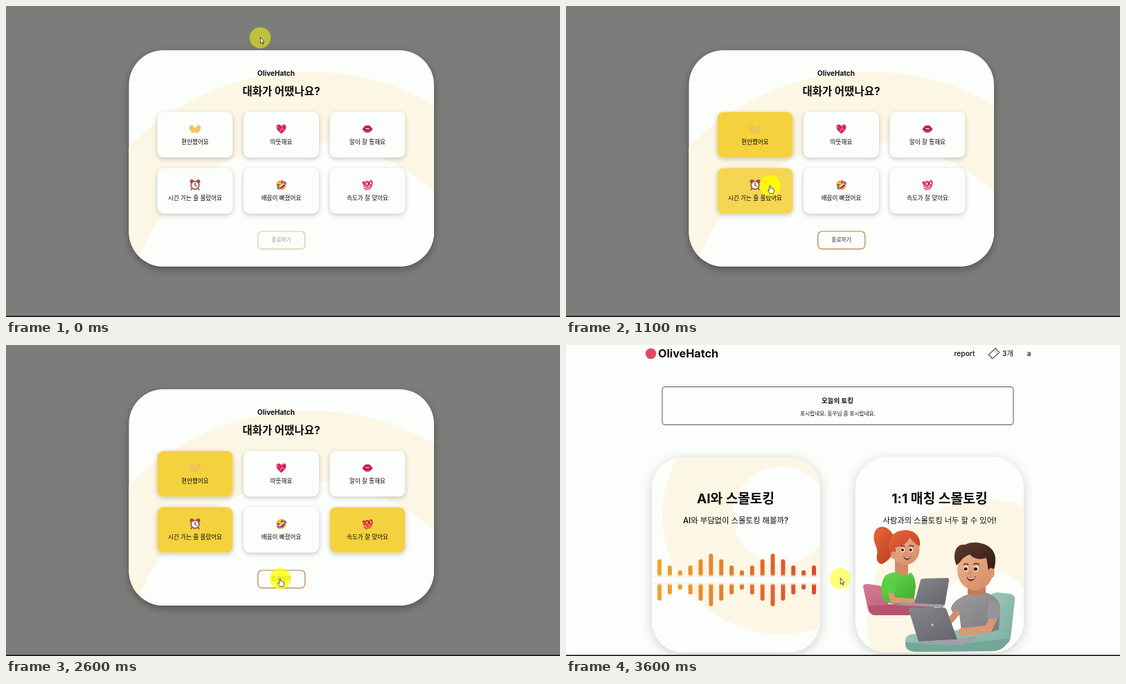
These frames come from a looping animation (800x450 px, 4000 ms). An HTML page:

```html
<!DOCTYPE html>
<html lang="ko">
<head>
<meta charset="utf-8">
<title>OliveHatch</title>
<style>
html, body { margin: 0; width: 100%; height: 100%; overflow: hidden; background: #7b7d7a; }
svg { display: block; width: 100%; height: 100%; }
text { font-family: Inter, "Noto Sans CJK KR", "Noto Sans CJK", sans-serif; text-anchor: middle; fill: #0c0c0c; }
.modal { filter: drop-shadow(0 4px 6px rgba(0,0,0,.32)); }
.card { filter: drop-shadow(0 2px 3px rgba(0,0,0,.22)); }
.panel { filter: drop-shadow(0 3px 8px rgba(0,0,0,.18)); }
</style>
</head>
<body>
<svg id="stage" viewBox="0 0 800 450" preserveAspectRatio="none"></svg>
<script>
const LOOP = 4000, STEP = 100;
const PAPER = '#fcfefb', CREAM = '#fcf6e4';
const stage = document.getElementById('stage');

const text = (s, x, cy, size, weight = 500, extra = '') =>
  `<text x="${x}" y="${cy + size * .37}" font-size="${size}" font-weight="${weight}" ${extra}>${s}</text>`;
const rect = (x, y, w, h, r, fill, extra = '') =>
  `<rect x="${x}" y="${y}" width="${w}" height="${h}" rx="${r}" fill="${fill}" ${extra}/>`;
const circle = (x, y, r, fill, extra = '') =>
  `<circle cx="${x}" cy="${y}" r="${r}" fill="${fill}" ${extra}/>`;
const oval = (x, y, rx, ry, fill, extra = '') =>
  `<ellipse cx="${x}" cy="${y}" rx="${rx}" ry="${ry}" fill="${fill}" ${extra}/>`;
const path = (d, fill, extra = '') => `<path d="${d}" fill="${fill}" ${extra}/>`;
const line = (d, color, width, extra = '') =>
  path(d, 'none', `stroke="${color}" stroke-width="${width}" stroke-linecap="round" stroke-linejoin="round" ${extra}`);
const rings = (x, y, outer, inner) => circle(x, y, outer, CREAM) + circle(x, y, inner, PAPER);

// Icons are drawn around 0,0 in a 16 px box
const hand = path('M-.6 4.6 C-2 6-4.4 5.8-5.6 4 L-8-1.2 C-8.2-2.6-7-2.8-6.6-2 L-7-4.2 C-6.8-5.5-5.5-5.2-5.2-4 L-4.9-4.8 C-4.4-6-3.2-5.3-3.2-4.2 L-2.6 -1 C-2-2.6-.6-2-.7-.6Z',
  '#f6c94f', 'stroke="#eab06c" stroke-width=".8"') + line('M-5.8-2 L-4.4 1.4 M-4.1-3 L-3.2 .6', '#eab882', .7);
const icons = {
  palms: hand + `<g transform="scale(-1 1)">${hand}</g>`,
  heart: path('M0 7.4 C-5 3-7.2 0-7-3 C-6.6-7-2-7.3 0-3.8 C2-7.3 6.6-7 7-3 C7.2 0 5 3 0 7.4Z', '#d81f63') +
    line('M-5.8-2.6 Q-1-1.5 5.6 2 M2.6-5.4 Q1.5 0-2.4 4.6', '#f0688c', 1.6) +
    path('M1.5-1 Q-3-5.4-3.4-1.8 Q-3 .4 1.5-1 Q3.2-5.6 5-3.2 Q5.4-1 1.5-1Z', '#a92262'),
  lips: path('M-7.6 .6 C-5-3-3-5.4-1.3-5.2 Q0-4.6 1.3-5.2 C3-5.4 5-3 7.6 .6 C5 4.2 3 5.8 0 5.8 C-3 5.8-5 4.2-7.6 .6Z', '#d61c57') +
    path('M-5.4 .3 Q-2-1.7 0-1 Q2-1.7 5.4 .3 Q0 3.2-5.4 .3Z', '#5c1030') +
    path('M-4 .1 Q-1.6-1.2 0-.6 Q1.6-1.2 4 .1 Q0 1.1-4 .1Z', '#fff') +
    line('M-3 4 Q0 5 3 4', '#f4608c', .9),
  clock: line('M-4.4 5 L-5.8 7 M4.4 5 L5.8 7', '#8d3a3a', 1.6) +
    circle(-4.6, -5, 2.9, '#a94a48') + circle(4.6, -5, 2.9, '#a94a48') +
    circle(0, .4, 6.6, '#a9413f') + circle(0, .4, 5.1, '#e9eeee') +
    line('M0-3 L0 .4 L2.5 2', '#333', 1) + circle(0, .4, .8, '#c33'),
  laugh: `<g transform="rotate(-38)">${circle(0, 0, 7.2, '#f4b63a')}${path('M-5 .2 H5 C4.6 6.5-4.6 6.5-5 .2Z', '#7c2340')}
    ${path('M-4.2 .4 H4.2 V1.9 H-4.2Z', '#fff')}${oval(0, 4.2, 2.4, 1.1, '#e7416d')}
    ${line('M-4.6-3.8 L-2-2.4 L-4.6-1.4 M4.6-3.8 L2-2.4 L4.6-1.4', '#6b2d4c', 1)}
    ${oval(-6.3, 1, 1.4, 2.5, '#6e6bc9')}${oval(6.3, 1, 1.4, 2.5, '#6e6bc9')}</g>`,
  hundred: `<g transform="skewX(-8) rotate(-9)">${line('M-6.5-4 L-4.6-5.4 V1.5', '#d8184e', 1.9)}
    ${oval(-.6, -1.8, 1.9, 3.3, 'none', 'stroke="#d8184e" stroke-width="1.8"')}
    ${oval(4.8, -1.8, 1.9, 3.3, 'none', 'stroke="#d8184e" stroke-width="1.8"')}
    ${line('M-5 4.4 Q0 3 6 3.6 M-3 6.8 Q0 5.7 4 6', '#d8184e', 1.4)}</g>`
};

const cards = [
  ['palms', '편안했어요'], ['heart', '따뜻해요'], ['lips', '말이 잘 통해요'],
  ['clock', '시간 가는 줄 몰랐어요'], ['laugh', '배꼽이 빠졌어요'], ['hundred', '속도가 잘 맞아요']
].map(([icon, label], i) => ({ icon, label, x: 218.5 + i % 3 * 124.5, y: 153.3 + (i / 3 | 0) * 81.2, w: 109, h: 66 }));

function cardMarkup({ icon, label, x, y, w, h }, i) {
  const cx = x + w / 2;
  return `<g class="card">${rect(x, y, w, h, 9, PAPER)}${rect(x, y, w, h, 9, '#f4d23d', `id="fill${i}"`)}</g>
    <g transform="translate(${cx} ${y + 24.4})">${icons[icon]}</g>${text(label, cx, y + 43.5, 8.6)}`;
}

const survey = `<g id="survey">${rect(0, 0, 800, 450, 0, '#7b7d7a')}
  <g class="modal"><g clip-path="url(#modalClip)">${rect(177, 64, 441, 313, 0, PAPER)}${rings(437, 460, 365, 263)}</g></g>
  ${text('OliveHatch', 390, 97, 10, 700)}
  ${text('대화가 어땠나요?', 397.5, 123.5, 15.5, 700)}
  ${cards.map(cardMarkup).join('')}
  ${rect(363.8, 326, 68, 25.6, 6, PAPER, 'id="button" stroke-width="1.2"')}
  ${text('종료하기', 397.5, 338.6, 7.7, 400, 'id="label"')}</g>`;

function wave() {
  const heights = [38, 30, 21, 14, 21, 30];
  let out = '';
  for (let i = 0; i < 16; i++) {
    const h = heights[(i + 1) % 6], k = i / 15;
    const color = `rgb(${236 - 18 * k}, ${166 - 92 * k}, ${44 + 6 * k})`;
    out += rect(132 + i * 14.87, 340 - h, 6, h * 2, 3, color);
  }
  return out + rect(110, 333.5, 270, 13, 0, '#f4f5f3', 'filter="url(#band)"') + rect(110, 336.5, 270, 7, 0, PAPER, 'filter="url(#band)"');
}

const face = (x, y, s) => `<g transform="translate(${x} ${y}) scale(${s})">
  ${oval(-9, -3, 3, 3.8, '#fff')}${oval(5, -3, 3.2, 3.8, '#fff')}${circle(-9.3, -2.8, 2.4, '#3a2118')}${circle(4.4, -2.8, 2.5, '#3a2118')}
  ${line('M-12-9 Q-9-11-6-9 M2-9.5 Q6-11.5 9-9', '#5b2c1c', 1.5)}${oval(-3.5, 3, 2.6, 2.1, '#d98c69')}
  ${path('M-8 8 Q-1 11 5 7 Q2 15-3 14 Q-7 13-8 8Z', '#8a3028')}${path('M-6.8 8.7 Q-1 11 3.6 8.2 L2.6 10 Q-2 12-6 10Z', '#fff')}</g>`;

const girl = path('M429 350 Q429 345 437 346 L452 348 Q459 350 460 358 L466 375 L524 373 Q532 374 532 381 V386 Q530 391 520 391 L445 391 Q438 390 436 382Z', 'url(#pink)') +
  path('M436 378 L464 376 L528 380 Q532 389 520 391 L445 391 Q438 389 436 378Z', '#b65370') +
  path('M474 277 C464 258 448 260 445 273 C442 286 452 294 449 304 C447 312 452 317 456 317 C470 311 477 297 474 277Z', 'url(#ginger)') +
  path('M475 310 H494 V336 H475Z', '#d18b66') +
  path('M462 333 Q474 326 482 331 Q491 336 498 329 Q505 336 505 350 L502 372 Q480 379 460 371 C453 360 454 341 462 333Z', 'url(#green)') +
  line('M465 347 L472 369 L503 371', '#dd9a76', 8) + path('M457 342 Q464 330 472 341 L477 356 Q469 362 459 357Z', '#59cf43') +
  oval(490, 296, 20.5, 22, 'url(#skin)') +
  path('M470 306 C461 290 467 269 488 268 C504 267 513 278 511 291 C504 288 500 283 496 279 C492 289 482 292 476 293 Q477 303 473 309Z', 'url(#ginger)') +
  oval(473, 304, 4, 5.5, '#dd9a76') + face(494, 299, .85) +
  path('M512 340 Q513 338 516 338 L551 337 Q554 338 553 341 L547 376 L503 374Z', 'url(#metal)') +
  path('M481 372 L547 376 L544 380 L481 376Z', '#9a9ca1');

const boy = path('M612 365 Q614 358 623 358 L642 360 Q649 362 648 370 L642 424 Q640 434 628 436 L604 432Z', 'url(#teal)') +
  path('M490 426 Q492 418 503 418 L613 408 L640 423 Q636 440 618 443 L505 444 Q490 443 490 434Z', 'url(#teal)') +
  path('M490 430 Q555 437 640 424 Q636 440 618 443 L505 444 Q490 442 490 430Z', '#74a799') +
  path('M580 343 H606 V370 H580Z', '#c47d59') +
  path('M571 365 Q580 359 587 362 Q596 365 605 358 Q624 362 627 380 L625 412 Q598 422 571 414 L568 390 Q556 390 556 380 Q560 370 571 365Z', 'url(#gray)') +
  line('M564 388 L552 402', '#d08f6b', 9) + line('M619 391 L610 411 L572 415', '#d99874', 11) +
  path('M611 371 Q625 368 627 384 L627 394 Q616 400 607 393Z', '#98959a') +
  oval(591, 326, 26, 29, 'url(#skin)') +
  path('M564 319 C557 303 563 287 576 289 C587 282 617 285 620 307 Q621 321 615 331 L610 326 L607 308 Q592 313 583 303 Q573 307 569 314Z', 'url(#brown)') +
  oval(614, 330, 5, 7.5, '#d99874') + face(587, 327, 1.05) +
  path('M495 384 Q495 380 499 380 L545 380 Q549 380 550 384 L565 426 L509 429Z', 'url(#metal)') +
  path('M509 429 L565 426 L592 421 L596 424 L570 434 L511 433Z', '#9fa1a6') + circle(529, 405, 2, '#b6b8bd');

const panel = (x, id, body) =>
  `<g class="panel"><g clip-path="url(#${id})">${rect(x, 162, 243, 283, 0, PAPER)}${body}</g></g>`;

const home = `<g id="home">${rect(0, 0, 800, 450, 0, PAPER)}
  ${circle(122.5, 12.5, 7.8, '#dd4a66')}
  ${text('OliveHatch', 176.5, 12.3, 16.2, 700)}
  ${text('report', 575.5, 12.3, 10.3)}
  <g transform="translate(618 12.3) rotate(-42)">${line('M-7-4 H7 V-1.5 A1.6 1.6 0 0 0 7 1.5 V4 H-7 V1.5 A1.6 1.6 0 0 0-7-1.5Z', '#333', 1)}${line('M3-3.5 V3.5', '#555', .7, 'stroke-dasharray="1 1.8"')}</g>
  ${text('3개', 638, 12.3, 10.2)}${text('a', 668.5, 12.3, 10)}
  ${rect(139, 60.5, 507, 55, 4, PAPER, 'stroke="#555" stroke-width="1"')}
  ${text('오늘의 토킹', 392, 80.2, 9.5, 700)}
  ${text('포시랍네요. 동우님 좀 포시랍네요.', 392.5, 99, 7.6)}
  ${panel(124, 'leftClip', rings(311, 246.5, 172, 70.5) + wave())}
  ${panel(418, 'rightClip', rings(607, 396, 172, 70) + girl + boy)}
  ${text('AI와 스몰토킹', 245, 222, 19.1, 700)}
  ${text('AI와 부담없이 스몰토킹 해볼까?', 245, 253.5, 11.4)}
  ${text('1:1 매칭 스몰토킹', 539.5, 222, 19.3, 700)}
  ${text('사람과의 스몰토킹 너두 할 수 있어!', 539.5, 253.5, 11.3)}</g>`;

const outline = 'stroke="#222" stroke-width=".8" stroke-linejoin="round"';
const cursor = `<g id="cursor">${circle(0, 0, 15.2, '#ff0', 'id="halo"')}
  <g id="arrow">${path('M.3-.8 V8.2 L2.3 6.4 L3.7 9.4 L5 8.8 L3.6 5.9 H6Z', '#fff', outline)}</g>
  <g id="hand">${path('M-1.3 6 V.2 Q-.4-1.4 .6 .2 V3.8 Q1.6 3 2.3 4 Q3.3 3.4 3.9 4.5 Q5.4 4.2 5.5 5.8 V8.3 Q5 9.6 4.4 11.4 H-.7 Q-1.4 9.6-3.3 7.2 Q-3.6 5.3-1.3 6.8Z', '#fff', outline)}</g>
  <g id="busy">${circle(0, 0, 3.6, '#fff', 'stroke="#222" stroke-width="2.6"')}${circle(0, 0, 3.6, 'none', 'stroke="#b3202c" stroke-width="1.3"')}${line('M-2.5-2.5 L2.5 2.5', '#6b1219', 1.7)}</g></g>`;

const blend = (id, a, b) =>
  `<linearGradient id="${id}" x1="0" y1="0" x2=".8" y2="1"><stop stop-color="${a}"/><stop offset="1" stop-color="${b}"/></linearGradient>`;
const clip = (id, x, y, w, h, r) => `<clipPath id="${id}">${rect(x, y, w, h, r, '#000')}</clipPath>`;

stage.innerHTML = `<defs>
  ${clip('modalClip', 177.5, 64, 440.5, 313, 50)}${clip('leftClip', 124, 162, 243, 283, 45)}${clip('rightClip', 418, 162, 243, 283, 45)}
  ${blend('pink', '#d57c96', '#b85472')}${blend('teal', '#a3cabd', '#7aaea0')}${blend('ginger', '#e9683a', '#bd3f22')}
  ${blend('green', '#6bdc4c', '#3fae31')}${blend('skin', '#f0b48e', '#d58d67')}${blend('brown', '#5c3a2c', '#341c16')}
  ${blend('gray', '#a09da0', '#7f7c80')}${blend('metal', '#85878c', '#65676c')}
  <filter id="band" x="-5%" y="-60%" width="110%" height="220%"><feGaussianBlur stdDeviation="0 1.2"/></filter>
  </defs>${survey}${home}${rect(0, 448.4, 800, 2, 0, '#121212')}${cursor}`;

const $ = id => document.getElementById(id);

// Each row: time, then values
const track = [
  [0, 367, 46], [100, 352, 70], [200, 310, 130], [300, 278, 171], [400, 274, 175], [600, 274, 175],
  [700, 276, 187], [800, 283, 215], [900, 291, 245], [1000, 294, 257], [1100, 295, 260], [1200, 295, 263],
  [1700, 295, 263], [1800, 345, 262], [1900, 445, 262], [2000, 506, 262], [2100, 517, 262], [2200, 517, 262],
  [2300, 495, 288], [2400, 436, 336], [2500, 402, 347], [2600, 396, 338]
];
const fills = {
  0: [[300, 0], [400, .24], [500, .32], [600, .7], [800, 1]],
  3: [[900, 0], [1000, .35], [1100, .9], [1300, 1]],
  5: [[1900, 0], [2000, .3], [2100, .8], [2200, 1]]
};
const enable = [[500, 0], [600, .3], [800, 1]];
const SAVE = 2900, SWITCH = 3300;

function at(keys, t, col = 1) {
  const i = keys.findIndex(k => k[0] > t);
  if (i < 0) return keys[keys.length - 1][col];
  if (i === 0) return keys[0][col];
  const a = keys[i - 1], b = keys[i];
  return a[col] + (b[col] - a[col]) * (t - a[0]) / (b[0] - a[0]);
}
const mix = (a, b, k) => `rgb(${a.map((v, i) => Math.round(v + (b[i] - v) * k))})`;
const inside = (x, y, b) => x > b.x && x < b.x + b.w && y > b.y && y < b.y + b.h;
const targets = [...cards, { x: 363, y: 325, w: 69, h: 27 }];
const show = (id, on) => $(id).setAttribute('visibility', on ? 'visible' : 'hidden');

function draw(t) {
  const x = at(track, t, 1), y = at(track, t, 2);
  const atHome = t >= SWITCH, saving = t >= SAVE && !atHome;
  const over = !atHome && !saving && targets.some(b => inside(x, y, b));

  show('survey', !atHome);
  show('home', atHome);
  cards.forEach((c, i) => $('fill' + i).setAttribute('opacity', fills[i] ? at(fills[i], t) : 0));

  const k = at(enable, t);
  $('button').setAttribute('stroke', mix([219, 193, 162], [181, 128, 70], k));
  $('label').style.fill = saving ? '#777' : mix([150, 150, 148], [35, 35, 35], k);
  $('label').textContent = saving ? '저장 중...' : '종료하기';

  $('cursor').setAttribute('transform', `translate(${x} ${y})`);
  $('halo').setAttribute('opacity', over ? .78 : .52);
  show('arrow', !over && !saving);
  show('hand', over);
  show('busy', saving);
}

const start = performance.now();
function tick() {
  const t = (performance.now() - start) % LOOP;
  draw(Math.floor(t / STEP) * STEP);
  requestAnimationFrame(tick);
}
tick();
</script>
</body>
</html>
```
